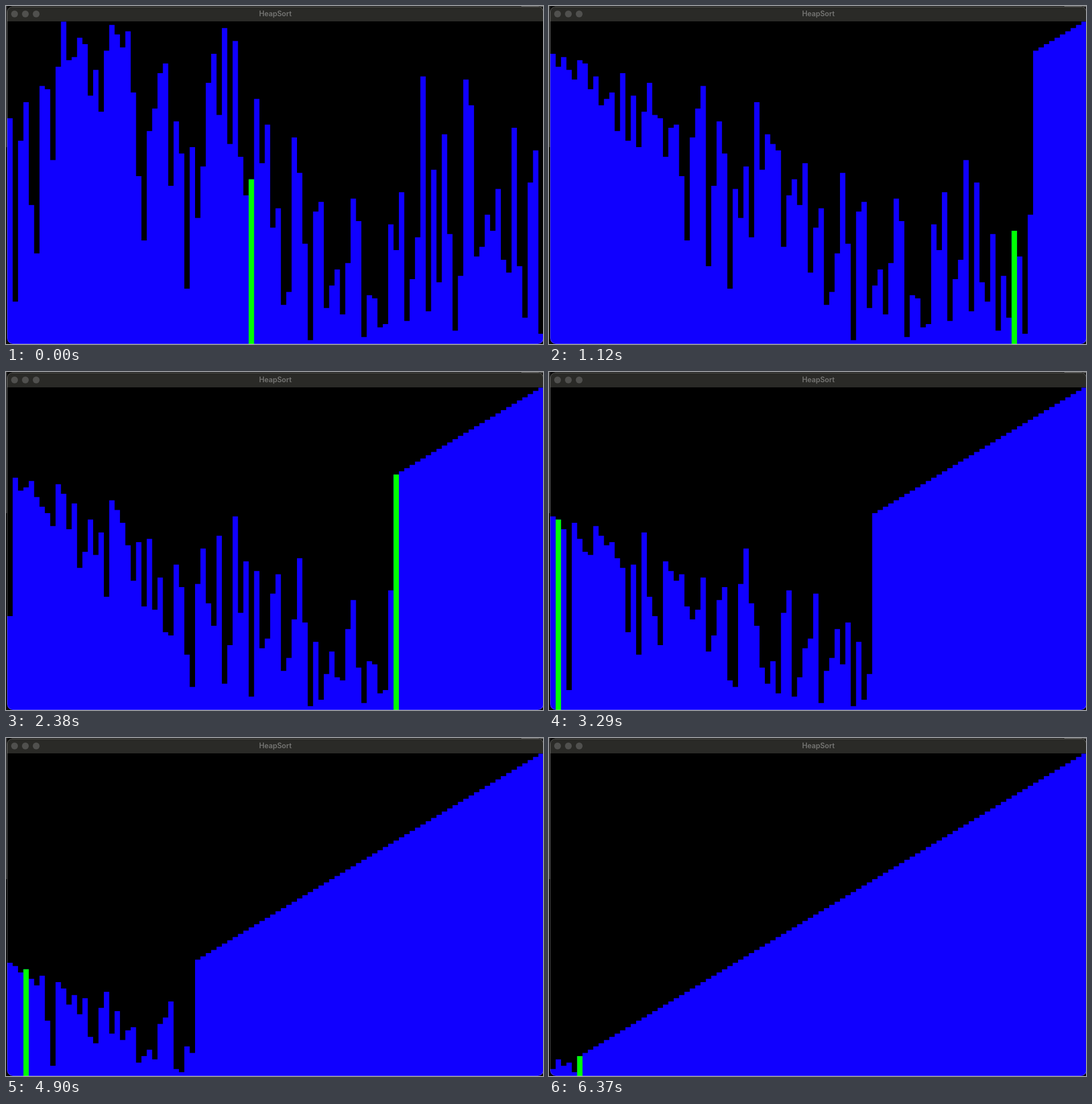
Recreate the animation shown at these times as an HTML page with a canvas. Size 943 by 594 pixels, loop 6.44 s.

```html
<!DOCTYPE html>
<html lang="en">
<head>
<meta charset="utf-8">
<title>HeapSort</title>
<style>
  html, body { margin: 0; width: 100%; height: 100%; overflow: hidden; background: #0b0b0b; }
  #stage { position: relative; width: 943px; height: 594px; overflow: hidden; background: #0b0b0b; }
  #edge { position: absolute; left: 0; top: 0; width: 2px; height: 248px; background: #343434; }
  #corner { position: absolute; left: 905px; top: 0; width: 38px; height: 2px; background: #555; }
  #window { position: absolute; left: 2px; top: 1px; width: 942px; height: 593px;
    border-radius: 9px 9px 10px 10px; overflow: hidden; background: #000; }
  #bar { position: absolute; left: 0; top: 0; width: 100%; height: 26px; background: #2a2a27; }
  #bar i { position: absolute; top: 7px; width: 12px; height: 12px; border-radius: 50%; background: #50504e; }
  #bar span { position: absolute; left: 0; width: 942px; top: 0; line-height: 26px; text-align: center;
    font: 600 12.5px/26px Inter, sans-serif; color: #757573; }
  canvas { position: absolute; left: -2px; top: -1px; display: block; }
  #rim { position: absolute; inset: 0; border-radius: inherit; box-shadow: inset 0 0 0 1px rgba(255,255,255,.25); }
</style>
</head>
<body>
<div id="stage">
  <div id="edge"></div>
  <div id="corner"></div>
  <div id="window">
    <canvas id="view" width="943" height="594"></canvas>
    <div id="bar">
      <i style="left:7px"></i><i style="left:26px"></i><i style="left:45px"></i>
      <span>HeapSort</span>
    </div>
    <div id="rim"></div>
  </div>
</div>
<script>
const STEP = 70, STEPS = 92;
const LEFT = 2.3, BAR = 9.42, FLOOR = 593, UNIT = 5.655;

// The array part-way through heap building: nodes 10 and up are already in order.
const values = [
  70, 13, 63, 75, 43, 28, 80, 79, 57, 86, 100, 88, 89, 95, 93, 77, 85, 72, 91, 99,
  96, 92, 97, 78, 52, 32, 66, 73, 84, 87, 49, 69, 59, 17, 61, 39, 55, 81, 90, 71,
  98, 62, 94, 58, 46, 51, 76, 56, 68, 36, 42, 12, 16, 64, 53, 31, 1, 41, 44, 11,
  18, 23, 9, 25, 45, 38, 2, 15, 14, 5, 6, 37, 29, 47, 7, 20, 33, 83, 10, 54,
  19, 65, 34, 4, 21, 82, 74, 27, 30, 40, 35, 48, 26, 22, 67, 24, 8, 50, 60, 3
];
const history = [];
const extraction = [];

function record(active) {
  history.push({ bars: values.slice(), active });
}

function swap(a, b) {
  [values[a], values[b]] = [values[b], values[a]];
}

function siftDown(node, size) {
  for (;;) {
    let largest = node;
    for (const child of [2 * node + 1, 2 * node + 2]) {
      if (child < size && values[child] > values[largest]) largest = child;
    }
    if (largest !== node) swap(node, largest);
    record(node);
    if (largest === node) return;
    node = largest;
  }
}

function heapSort() {
  record(45);
  for (let node = 9; node >= 0; node--) siftDown(node, values.length);
  for (let end = values.length - 1; end > 0; end--) {
    swap(0, end);
    extraction[end] = history.length;
    record(end);
    siftDown(0, end);
  }
}

heapSort();

// Pace of the sort: [display step, index in history]
const pace = [
  [0, 0],
  [9, extraction[96] + 2],
  [23, extraction[83] + 3],
  [34, extraction[72]],
  [47, extraction[60] + 2],
  [70, extraction[35] + 3],
  [91, extraction[5]]
];

function stateAt(step) {
  const next = Math.max(1, pace.findIndex(p => p[0] >= step));
  const [s0, h0] = pace[next - 1], [s1, h1] = pace[next];
  return history[Math.round(h0 + (h1 - h0) * (step - s0) / (s1 - s0))];
}

const ctx = document.getElementById('view').getContext('2d');
const barX = i => LEFT + BAR * i;
const barY = v => FLOOR - UNIT * v;

function draw({ bars, active }) {
  ctx.fillStyle = '#000';
  ctx.fillRect(0, 0, 943, 594);
  ctx.fillStyle = '#1000ff';
  ctx.beginPath();
  ctx.moveTo(0, 594);
  bars.forEach((v, i) => {
    ctx.lineTo(i ? barX(i) : 0, barY(v));
    ctx.lineTo(barX(i + 1), barY(v));
  });
  ctx.lineTo(barX(bars.length), 594);
  ctx.fill();
  ctx.fillStyle = '#00ff00';
  const top = barY(bars[active]);
  ctx.fillRect(barX(active), top, BAR, 594 - top);
}

let start, shown = -1;
function tick(now) {
  start ??= now;
  const step = Math.floor((now - start) / STEP) % STEPS;
  if (step !== shown) draw(stateAt(shown = step));
  requestAnimationFrame(tick);
}
draw(history[0]);
requestAnimationFrame(tick);
</script>
</body>
</html>
```
